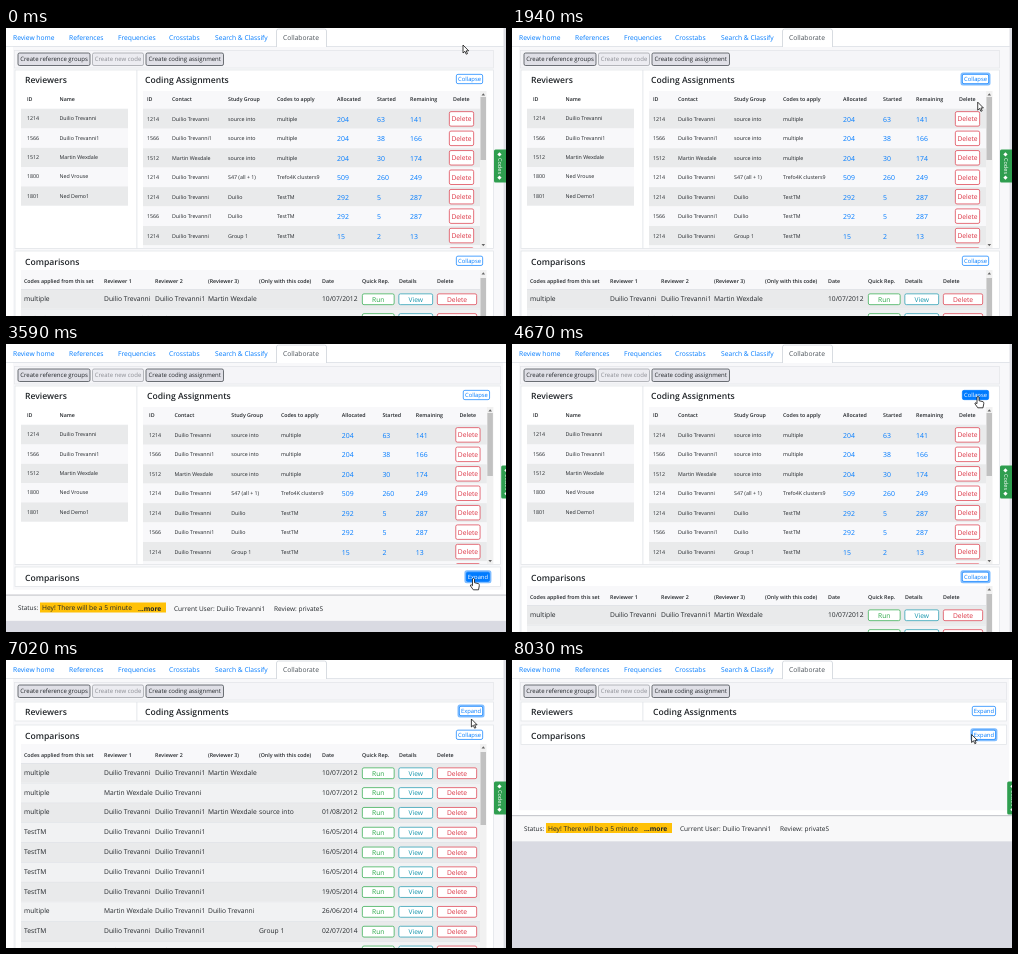
An HTML page that plays this animation: 500x288 px, repeating every 8.26 s.

```html
<!DOCTYPE html>
<html lang="en">
<head>
<meta charset="utf-8">
<title>Collapsible panels</title>
<style>
html, body { margin: 0; width: 100%; height: 100%; overflow: hidden; background: #fff; }
svg { display: block; width: 500px; height: 288px; font-family: "Open Sans", "Noto Sans", sans-serif; text-rendering: geometricPrecision; white-space: pre; }
</style>
</head>
<body>
<svg id="stage" viewBox="0 0 500 288"></svg>
<script>
const LOOP = 8260;
const BLUE = '#007bff', RED = '#dc3545', GREEN = '#28a745', TEAL = '#1796ad', INK = '#212529';
const LINE = '#dee2e6', PALE = '#f8f8fa', STRIPE = '#e9eaeb';
const ANN = 'Duilio Trevanni', ANN1 = ANN + '1', BOB = 'Martin Wexdale';

const people = [[1214, ANN], [1566, ANN1], [1512, BOB], [1800, 'Ned Vrouse'], [1801, 'Ned Demo1']];
const assignments = [
  [1214, ANN, 'source into', 'multiple', 204, 63, 141],
  [1566, ANN1, 'source into', 'multiple', 204, 38, 166],
  [1512, BOB, 'source into', 'multiple', 204, 30, 174],
  [1214, ANN, 'S47 (all + 1)', 'Trefo4K clusters9', 509, 260, 249],
  [1214, ANN, ANN.split(' ')[0], 'TestTM', 292, 5, 287],
  [1566, ANN1, ANN.split(' ')[0], 'TestTM', 292, 5, 287],
  [1214, ANN, 'Group 1', 'TestTM', 15, 2, 13],
  []
];
const testRow = date => ['TestTM', ANN, ANN1, '', '', date];
const comparisons = [
  ['multiple', ANN, ANN1, BOB, '', '10/07/2012'],
  ['multiple', BOB, ANN, '', '', '10/07/2012'],
  ['multiple', ANN, ANN1, BOB, 'source into', '01/08/2012'],
  testRow('16/05/2014'), testRow('16/05/2014'), testRow('16/05/2014'), testRow('19/05/2014'),
  ['multiple', BOB, ANN1, ANN, '', '26/06/2014'],
  ['TestTM', ANN, ANN1, '', 'Group 1', '02/07/2014'],
  testRow('02/07/2014')
];

// Pointer moves: first step time, last step time, step count, points to pass
const start = [457, 17];
const moves = [
  [80, 160, 2, [465, 47]],
  [390, 390, 1, [465.5, 47.5]],
  [1870, 2340, 7, [467, 234]],
  [2490, 2490, 1, [467.5, 234.5]],
  [3910, 4520, 9, [466, 51.5]],
  [4670, 4670, 1, [466, 52.5]],
  [7020, 7720, 10, [463, 85], [459.6, 74.5]]
];
const clicks = [[620, 690], [1320, 1470], [2570, 2650], [3420, 3590], [6150, 6320], [7870, 8030]];

let pointer, hovering;

function pointerAt(t) {
  let pos = start;
  for (const [from, to, steps, ...points] of moves) {
    if (t < from) break;
    const done = to > from ? Math.min(steps, 1 + Math.floor((t - from) / (to - from) * (steps - 1) + 1e-6)) : 1;
    const path = [pos, ...points];
    const along = done / steps * points.length;
    const i = Math.min(points.length - 1, Math.floor(along));
    pos = path[i].map((v, axis) => v + (path[i + 1][axis] - v) * (along - i));
  }
  return pos;
}

const rect = (x, y, w, h, fill, stroke = 'none', r = 0, more = '') =>
  `<rect x="${x}" y="${y}" width="${w}" height="${h}" rx="${r}" fill="${fill}" stroke="${stroke}" stroke-width=".7" ${more}/>`;

const text = (x, y, s, size, fill = INK, weight = 400, anchor = 'start') =>
  `<text x="${x}" y="${y}" font-size="${size}" fill="${fill}" font-weight="${weight}" text-anchor="${anchor}">${s}</text>`;

function button(x, y, w, h, label, size, color, focused) {
  const [px, py] = pointer;
  const hot = px >= x && px <= x + w && py >= y && py <= y + h;
  if (hot) hovering = true;
  const ring = focused ? rect(x - 1.5, y - 1.5, w + 3, h + 3, '#80bdff', 'none', 2.5) : '';
  return ring + rect(x + .35, y + .35, w - .7, h - .7, hot ? color : '#fff', color, 1.6) +
    text(x + w / 2, y + h / 2 + size * .36, label, size, hot ? '#fff' : color, 400, 'middle');
}

function toggle(right, y, open, focused) {
  const w = open ? 27 : 24;
  return button(right - w, y, w, 10, open ? 'Collapse' : 'Expand', 5.8, BLUE, focused);
}

const heading = (x, y, s) => text(x, y, s, 8.6, INK, 600);

const headers = (xs, y, labels) =>
  labels.map((s, i) => text(xs[i], y, s, 5.3, INK, 600)).join('');

function scrollbar(x, top, bottom, thumbTop, thumbH) {
  return rect(x, top, 6.5, bottom - top, '#f1f1f1') +
    rect(x + .5, thumbTop, 5.5, thumbH, '#c1c1c1') +
    `<path d="M${x + 1.5} ${top + 4.5}l1.8-2.2 1.8 2.2zM${x + 1.5} ${bottom - 4}l1.8 2.2 1.8-2.2z" fill="#666"/>`;
}

function tabs() {
  const items = [[7, 'Review home'], [63, 'References'], [112, 'Frequencies'], [163, 'Crosstabs'], [209, 'Search &amp; Classify']];
  return rect(0, 0, 500, 18, '#fff') + rect(0, 18, 500, .8, LINE) +
    items.map(([x, s]) => text(x, 12, s, 6.7, BLUE)).join('') +
    '<path d="M270.5 19V3q0-2 2-2h46q2 0 2 2v16" fill="#fff" stroke="#ced4da" stroke-width=".8"/>' +
    text(277, 12, 'Collaborate', 6.7, '#495057');
}

function toolbar(right) {
  const items = [[12, 72, 'Create reference groups'], [86.5, 51, 'Create new code'], [140, 77.5, 'Create coding assignment']];
  return rect(8.5, 22.5, right - 8.5, 17.5, '#f5f5f8', '#e3e4e8') +
    items.map(([x, w, s], i) => rect(x, 25, w, 12.5, i === 1 ? '#ececf1' : '#dfdfe6', i === 1 ? '#9a9ca3' : '#343a40', 1.6) +
      text(x + w / 2, 33.4, s, 6, i === 1 ? '#8b8d93' : INK, 400, 'middle')).join('');
}

function reviewers() {
  return headers([21, 53.5], 73, ['ID', 'Name']) + rect(15, 80.8, 107, .7, LINE) +
    people.map(([id, name], i) => {
      const y = 81.2 + i * 19.3;
      return rect(15, y, 107, 19.3, i % 2 ? PALE : STRIPE) +
        text(21, y + 11.2, id, 5.3) + text(53.5, y + 11.2, name, 5.3);
    }).join('');
}

function coding(k) {
  const xs = [141, 166, 222, 271, 331, 371, 404, 447].map(x => x * k);
  const left = 137, width = 474 * k - left;
  return '<clipPath id="body"><rect y="60" width="500" height="160"/></clipPath><g clip-path="url(#body)">' +
    rect(left, 63, width, 18, PALE) +
    headers(xs, 73, ['ID', 'Contact', 'Study Group', 'Codes to apply', 'Allocated', 'Started', 'Remaining', 'Delete']) +
    rect(left, 80.8, width, .7, LINE) +
    assignments.map((row, i) => {
      const y = 81.3 + i * 19.45;
      return rect(left, y, width, 19.45, i % 2 ? PALE : STRIPE) +
        row.map((s, c) => c < 4 ? text(xs[c], y + 11.5, s, 5.3) : text(xs[c], y + 12.6, s, 6.9, BLUE)).join('') +
        button(443 * k, y + 2, 25, 15.2, 'Delete', 6.7, RED);
    }).join('') +
    scrollbar(474 * k, 63, 220, 69, 63) + '</g>';
}

function comparing(top) {
  const xs = [18, 98, 149, 202, 253, 316, 356, 393, 431];
  return rect(15, top + 19, 459, 20, PALE) +
    headers(xs, top + 32, ['Codes applied from this set', 'Reviewer 1', 'Reviewer 2', '(Reviewer 3)', '(Only with this code)', 'Date', 'Quick Rep.', 'Details', 'Delete']) +
    comparisons.map((row, i) => {
      const y = top + 38 + i * 19.8;
      return rect(15, y, 459, 19.8, i % 2 ? '#f1f2f3' : STRIPE) + rect(15, y, 459, .6, LINE) +
        row.map((s, c) => text(xs[c], y + 11.7, s, 6.7)).join('') +
        button(356, y + 4.5, 32.5, 11.5, 'Run', 6.7, GREEN) +
        button(392.5, y + 4.5, 34.5, 11.5, 'View', 6.7, TEAL) +
        button(431, y + 4.5, 40, 11.5, 'Delete', 6.7, RED);
    }).join('') +
    scrollbar(474, top + 19, 420, top + 27, 73);
}

function footer(y) {
  return rect(0, y - 5, 500, 300, '#fff') + rect(0, y, 500, 26, '#f8f8f9') + rect(0, y - .3, 500, 1.2, '#c9cacf') +
    rect(0, y + 26, 500, 300, '#d9dae2') +
    rect(34, y + 7.7, 126, 10, '#ffc107') +
    text(12, y + 15.3, 'Status:', 6.4) + text(36, y + 15.3, 'Hey! There will be a 5 minute', 6.7) +
    text(132, y + 15.8, '...more', 6.7, INK, 700) +
    text(168, y + 16, 'Current User: ' + ANN1, 6.5) + text(268, y + 16, 'Review: privateS', 6.5);
}

function cursor([x, y]) {
  const shape = hovering
    ? 'M-1 .6Q0-.6 1 .6V4.2L5 5.2Q6 5.6 5.8 7L5 11.3H-.2L-3 7.4Q-3.4 6.2-2.2 6.3L-1 7.2Z'
    : 'M0 0V8L1.9 6.3L3.2 9.2L4.5 8.6L3.2 5.8H5.7Z';
  return `<path transform="translate(${x} ${y})" d="${shape}" fill="#fff" stroke="#111" stroke-width=".8"/>`;
}

function scene(t) {
  const codingOpen = t < 690 || t >= 1470 && t < 6320;
  const comparingOpen = t < 2810 || t >= 3660 && t < 8030;
  const focus = t < 620 ? '' : t < 2490 || t >= 6150 && t < 7870 ? 'coding' : 'comparing';
  const k = comparingOpen ? 1 : 1.0145; // wider once the page needs no scrollbar
  const right = 487.5 * k, edge = 477 * k;
  const top = codingOpen ? 223 : 65;
  pointer = pointerAt(t);
  hovering = false;

  let out = rect(0, 0, 500, 288, '#fff') + rect(7, 18, 490, 270, PALE) + tabs() + toolbar(right);
  out += rect(9, 42, right - 9, codingOpen ? 178.5 : 19, '#fff', LINE) +
    rect(130.5, 42, .8, codingOpen ? 178.5 : 19, LINE) +
    heading(19, 55, 'Reviewers') + heading(139 * k, 55, 'Coding Assignments');
  if (codingOpen) out += reviewers() + coding(k);
  out += toggle(edge, 46, codingOpen, focus === 'coding');

  out += rect(9, top, right - 9, comparingOpen ? 300 : 19.5, '#fff', LINE) + heading(19, top + 13.5, 'Comparisons');
  if (comparingOpen) out += comparing(top);
  out += toggle(edge, top + 4.8, comparingOpen, focus === 'comparing');

  if (comparingOpen) out += rect(497.5, 0, 2.5, 288, '#dddee4');
  else out += footer(codingOpen ? 250.8 : 155.3);

  const tabX = comparingOpen ? 488 : 495.2;
  out += rect(tabX, 121.5, 14, 33, '#2f9e4f', 'none', 1.5) +
    `<g transform="translate(${tabX + 4} 138) rotate(90)">${text(0, 0, '◆ Codes ◆', 5.6, '#fff', 400, 'middle')}</g>`;

  if (clicks.some(([a, b]) => t >= a && t < b))
    out += `<circle cx="${pointer[0]}" cy="${pointer[1]}" r="5.2" fill="#ffe600" fill-opacity=".6"/>`;
  return out + cursor(pointer);
}

const stage = document.getElementById('stage');
let shown = '';
function tick() {
  const next = scene(performance.now() % LOOP);
  if (next !== shown) stage.innerHTML = shown = next;
  requestAnimationFrame(tick);
}
tick();
</script>
</body>
</html>
```
